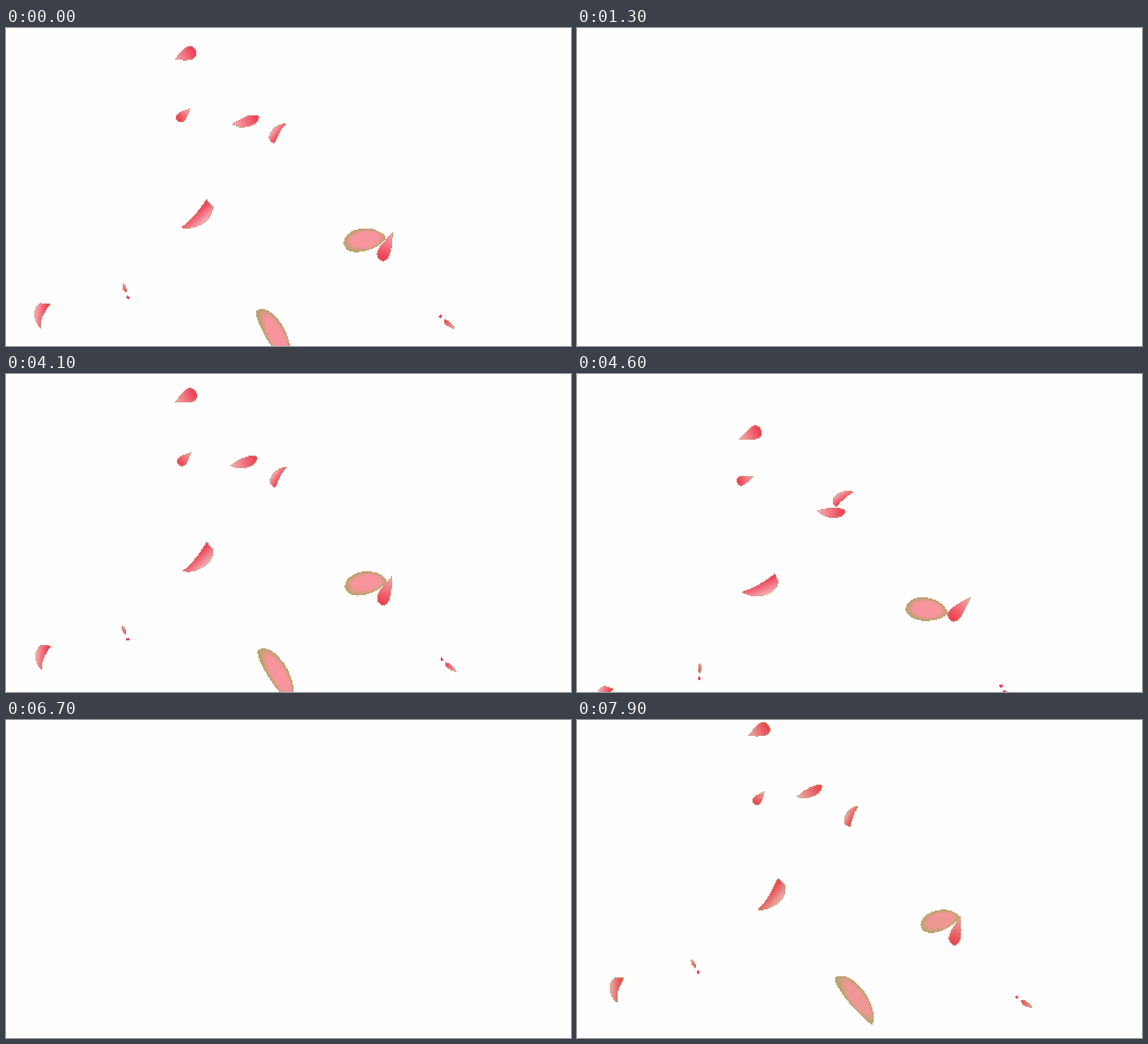
Recreate the animation shown at these times as an HTML page with a canvas. Size 998 px wide and 561 px high, loop 8 s.

```html
<!DOCTYPE html>
<html lang="en">
<head>
<meta charset="utf-8">
<title>Falling petals</title>
<style>
html, body { margin: 0; width: 100%; height: 100%; overflow: hidden; background: #fefefe; }
canvas { display: block; width: 998px; height: 562px; image-rendering: pixelated; }
</style>
</head>
<body>
<canvas id="stage" width="499" height="281"></canvas>
<script>
const LOOP = 8000, STEP = 100;
const canvas = document.getElementById('stage');
const ctx = canvas.getContext('2d', { willReadFrequently: true });

const clamp = v => Math.max(0, Math.min(1, v));
const lerp = (a, b, k) => a + (b - a) * k;
const mix = (a, b, k) => `rgb(${a.map((v, i) => Math.round(lerp(v, b[i], k)))})`;

// Each colour runs from fresh pink to the faded tone.
const TONES = {
  pale: [[247, 178, 186], [190, 184, 140]],
  dark: [[240, 62, 84], [206, 90, 60]],
  core: [[248, 148, 158], [210, 160, 120]],
  rim: [[184, 162, 106], [180, 178, 112]]
};

// Curve handles of the two sides in units of half length and bulge;
// cut is the width of a blunt far end on each side.
const SHAPES = {
  leaf: { a: [-.5, .6, .6, 1.7], b: [-.6, 1, .7, 1.5], cut: [0, 0] },
  sliver: { a: [-.6, 1.33, .6, 1.33], b: [-.6, 1.33, .6, 1.33], cut: [0, 0] },
  drop: { a: [-.4, .3, .85, 1.95], b: [-.4, .3, .85, 1.95], cut: [0, 0] },
  blade: { a: [-.4, -.3, .2, .1], b: [-.5, 1.1, .6, 1.4], cut: [1, .4] },
  oval: { a: [-.95, 1.3, .6, 1.4], b: [-1, 1.4, .5, 1.3], cut: [0, 0] }
};

// A pose is both ends and the bulge on either side.
const pose = (x1, y1, x2, y2, a, b) => ({
  x: (x1 + x2) / 2, y: (y1 + y2) / 2,
  turn: Math.atan2(y2 - y1, x2 - x1),
  half: Math.hypot(x2 - x1, y2 - y1) / 2, a, b
});
const moved = (p, dx, dy) => ({ ...p, x: p.x + dx, y: p.y + dy });

const petals = [];
function petal(shape, shade, from, to, dot = false) {
  const spin = to.turn - from.turn;
  petals.push({ shape: SHAPES[shape], shade, from, to, dot,
    spin: Math.atan2(Math.sin(spin), Math.cos(spin)) });
}

const high = pose(297, 50, 337, 33, 14, 12);
const low = pose(604, 498, 537, 522, 18, 2);
petal('leaf', 'along', pose(363, 48, 396, 16, 5, 8), pose(396, 161, 444, 146, 7, 13));
petal('drop', 'along', moved(high, 15, -91), high);
petal('drop', 'along', pose(345, 86, 340, 109, 8, 8), pose(328, 137, 305, 160, 9, 9));
petal('blade', 'across', pose(503, 109, 499, 147, 4, 11), pose(496, 164, 472, 198, 5, 13));
petal('blade', 'across', pose(345, 291, 364, 230, 11, 20), pose(311, 348, 360, 302, 8, 21));
petal('oval', 'round', pose(637, 322, 684, 290, 13, 10), pose(599, 377, 673, 364, 22, 18));
petal('drop', 'along', pose(663, 312, 671, 360, 8, 8), pose(683, 354, 664, 408, 10, 14));
petal('oval', 'round', pose(497, 349, 575, 393, 21, 4), pose(447, 486, 504, 581, 25, 10));
petal('sliver', 'across', low, moved(low, -7, 97));
petal('blade', 'across', pose(98, 421, 87, 379, -7, -15), pose(64, 523, 68, 478, -12, -14));
petal('sliver', 'along', pose(190, 353, 204, 363, 3, 3), pose(205, 443, 212, 460, 3, 3), true);
petal('leaf', 'along', pose(833, 450, 811, 444, 4, 3), pose(796, 526, 776, 509, 5, 4), true);

function outline(L, a, b, { a: [ax1, ay1, ax2, ay2], b: [bx1, by1, bx2, by2], cut }) {
  ctx.beginPath();
  ctx.moveTo(-L, 0);
  ctx.bezierCurveTo(ax1 * L, -ay1 * a, ax2 * L, -ay2 * a, L, -cut[0] * a);
  ctx.lineTo(L, cut[1] * b);
  ctx.bezierCurveTo(bx2 * L, by2 * b, bx1 * L, by1 * b, -L, 0);
  ctx.closePath();
}

function drawPetal(p, age, size, fade) {
  const k = (age - 100) / 650, grown = clamp(k);
  const at = key => lerp(p.from[key], p.to[key], k);
  const dim = key => lerp(p.from[key], p.to[key], grown) * size;
  const tone = key => mix(...TONES[key], fade);
  const L = dim('half'), a = dim('a'), b = dim('b');

  ctx.save();
  ctx.translate(at('x'), at('y'));
  ctx.rotate(p.from.turn + p.spin * k);
  outline(L, a, b, p.shape);
  ctx.save();
  let paint;
  if (p.shade === 'round') {
    ctx.translate(0, (b - a) / 2);
    ctx.scale(L, (a + b) / 2);
    paint = ctx.createRadialGradient(0, 0, .2, 0, 0, 1.05);
    paint.addColorStop(0, tone('core'));
    paint.addColorStop(.5, tone('core'));
    paint.addColorStop(1, tone('rim'));
  } else {
    paint = p.shade === 'along'
      ? ctx.createLinearGradient(-L, 0, L * .8, 0)
      : ctx.createLinearGradient(0, b, 0, -a / 2);
    paint.addColorStop(0, tone('pale'));
    paint.addColorStop(1, tone('dark'));
  }
  ctx.fillStyle = paint;
  ctx.fill();
  ctx.restore();

  ctx.globalCompositeOperation = 'source-atop';
  ctx.strokeStyle = tone('rim');
  ctx.globalAlpha = .5;
  ctx.lineWidth = p.shade === 'round' ? 5 : 2.5;
  ctx.stroke();
  ctx.globalCompositeOperation = 'source-over';
  ctx.globalAlpha = 1;

  if (p.dot) {
    ctx.fillStyle = tone('dark');
    ctx.fillRect(L + 6, -2, 4.5, 4.5);
  }
  ctx.restore();
}

// Hard pixel edges.
function harden() {
  const img = ctx.getImageData(0, 0, canvas.width, canvas.height);
  for (let i = 3; i < img.data.length; i += 4) img.data[i] = img.data[i] > 100 ? 255 : 0;
  ctx.putImageData(img, 0, 0);
}

// Age of the shower, or null while the stage is empty.
function ageAt(t) {
  if (t < 1300) return 800 + t * .95;
  if (t >= 2900 && t < 5300) return (t - 3300) * .94;
  if (t >= 6900) return t - 7300;
  return null;
}

function draw(t) {
  ctx.setTransform(1, 0, 0, 1, 0, 0);
  ctx.clearRect(0, 0, canvas.width, canvas.height);
  ctx.scale(.5, .5);
  const age = ageAt(t);
  if (age !== null) {
    const size = age < 0 ? lerp(1, .35, clamp(-age / 400)) : lerp(1, .3, clamp((age - 1300) / 650));
    const fade = Math.max(clamp(1 - age / 800), clamp((age - 1200) / 600));
    for (const p of petals) drawPetal(p, age, size, fade);
  } else {
    // First sliver before the shower.
    const s = t % 4000 - 2500;
    if (s >= 0 && s < 200) {
      ctx.fillStyle = mix(...TONES.dark, 1);
      ctx.fillRect(640, 150 + s / 10, 4, 10);
    }
  }
  harden();
}

let shown = -1;
function tick() {
  const t = Math.floor(performance.now() % LOOP / STEP) * STEP;
  if (t !== shown) draw(shown = t);
  requestAnimationFrame(tick);
}
tick();
</script>
</body>
</html>
```
